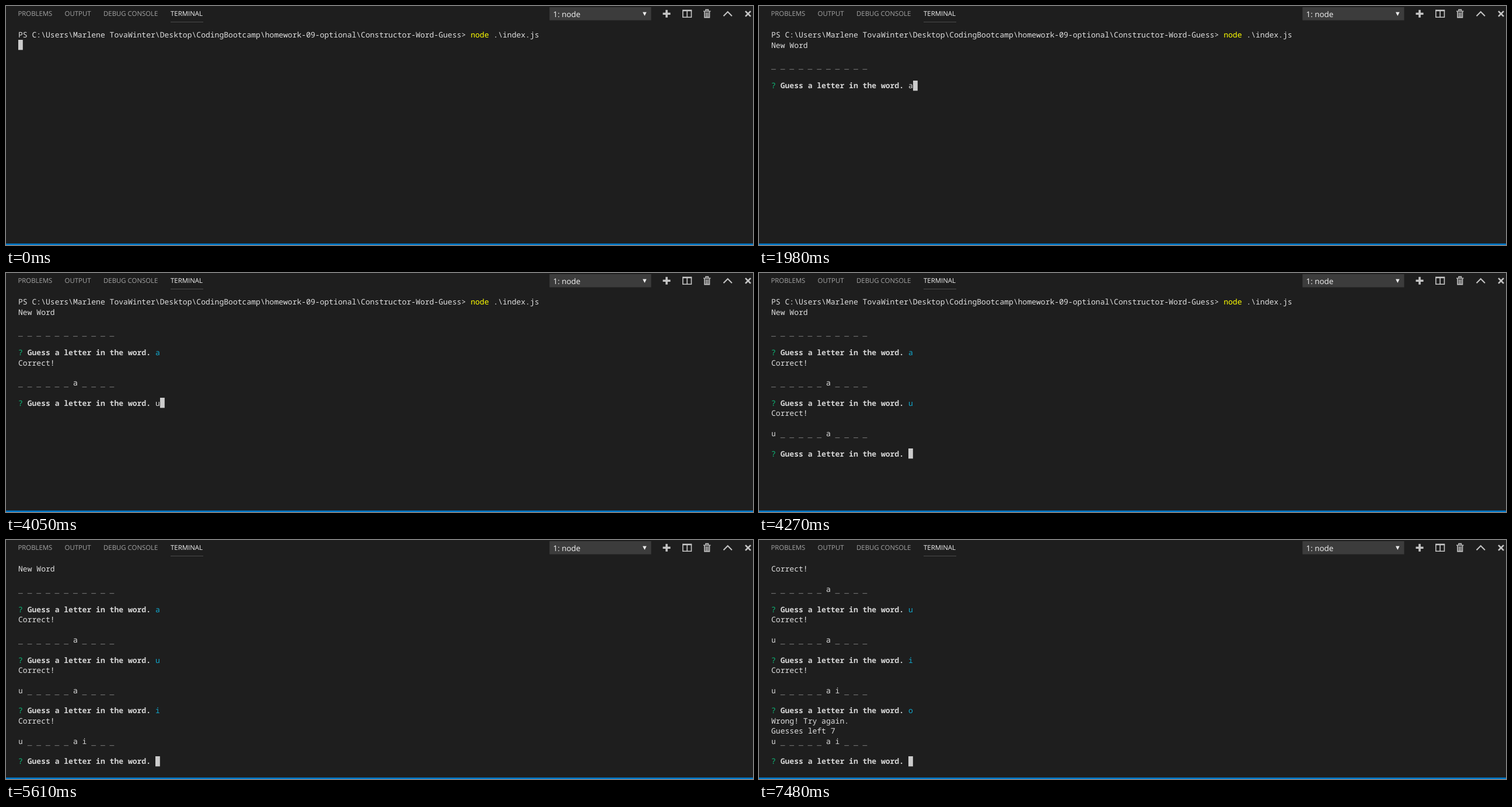
Write an HTML page that moves like this. It is 1280x410 px and loops after 8000 ms.

```html
<!DOCTYPE html>
<html lang="en">
<head>
<meta charset="utf-8">
<title>Word guess terminal</title>
<style>
  html, body { margin: 0; width: 100%; height: 100%; overflow: hidden; background: #1e1e1e; }
  svg { display: block; }
  text { white-space: pre; text-rendering: geometricPrecision; }
  .tabs { font: 11.4px "Open Sans", "Noto Sans", sans-serif; fill: #a4a4a4; }
  .tabs .active { fill: #f4f4f4; }
  .picker { font: 13.4px "Open Sans", "Noto Sans", sans-serif; fill: #f6f6f6; }
  .icons { fill: none; stroke: #c5c5c5; }
  #screen { font: 13.05px "Noto Sans Mono", "DejaVu Sans Mono", monospace; fill: #e0e0e0; }
  #screen .cursor { fill: #ccc; }
  #screen .command { fill: #ff0; }
  #screen .mark { fill: #0dbc79; }
  #screen .answer { fill: #11a8cd; }
  #screen .question { font-weight: 700; fill: #d6d6d6; }
  #screen .word { font: 13px "DejaVu Sans Mono", monospace; fill: #d6d6d6; }
</style>
</head>
<body>
<svg width="1280" height="410" viewBox="0 0 1280 410">
  <rect width="1280" height="410" fill="#1e1e1e"/>

  <g class="tabs">
    <text x="20.4" y="17">PROBLEMS</text>
    <text x="100.6" y="17">OUTPUT</text>
    <text x="167" y="17">DEBUG CONSOLE</text>
    <text x="282" y="17" class="active">TERMINAL</text>
  </g>
  <rect x="282" y="27" width="56" height="1" fill="#4c4c4c"/>

  <rect x="931.3" y="2" width="174.2" height="22.5" fill="#3c3c3c"/>
  <text class="picker" x="937.5" y="19">1: node</text>
  <path d="M1091 10.5h6.6l-3.3 6.5z" fill="#f0f0f0"/>

  <g class="icons">
    <path d="M1125.5 13.3h13M1132 6.8v13" stroke-width="3.6"/>
    <path d="M1159.8 8h14.6v11.3h-14.6zM1167.1 8v11.3" stroke-width="1.6"/>
    <path d="M1159 7.7h16.2" stroke-width="2.6"/>
    <path d="M1195 9h12.4M1199 8v-1.6h4.4v1.6" stroke-width="1.6"/>
    <path d="M1197 10v9.6h8.4V10M1199.8 11v8M1202.6 11v8" stroke-width="1.7"/>
    <path d="M1229.5 17.2l7.2-7.2 7.2 7.2" stroke-width="2"/>
    <path d="M1267 8.8l9 9M1276 8.8l-9 9" stroke-width="2.6"/>
  </g>

  <g id="screen"></g>
  <rect y="407.5" width="1280" height="2.5" fill="#007acc"/>
</svg>

<script>
const LOOP = 8000, ROWS = 20;
const LEFT = 21, TOP = 41.2, CELL = 7.83, PITCH = 17.36;
const QUESTION = 'Guess a letter in the word.';
const PATH = 'PS C:\\Users\\Marlene TovaWinter\\Desktop\\CodingBootcamp\\homework-09-optional\\Constructor-Word-Guess>';

// A line is a list of [column, text, class] pieces.
const plain = text => [[0, text, '']];
const prompt = (input, style) => [[0, '?', 'mark'], [2, QUESTION, 'question'], [30, input, style]];
const answer = letter => prompt(letter, 'answer');
const word = shown => [[0, [...shown].join(' '), 'word']];
const blank = [];

const log = [
  [[0, PATH, ''], [99, 'node', 'command'], [104, '.\\index.js', '']],
  plain('New Word'), blank, word('___________'), blank,
  answer('a'), plain('Correct!'), blank, word('______a____'), blank,
  answer('u'), plain('Correct!'), blank, word('u_____a____'), blank,
  answer('i'), plain('Correct!'), blank, word('u_____ai___'), blank,
  answer('o'), plain('Wrong! Try again.'), plain('Guesses left 7'), word('u_____ai___'), blank
];

// [start ms, line holding the cursor, typed input or null before the prompt]
const steps = [
  [0, 1, null], [320, 5, null], [390, 5, ''], [1980, 5, 'a'],
  [2440, 10, ''], [4050, 10, 'u'], [4270, 15, ''], [5290, 15, 'i'],
  [5610, 20, ''], [7310, 20, 'o'], [7480, 25, '']
];

const screen = document.getElementById('screen');
const escapeText = text => text.replace('>', '&gt;');
const drawPiece = row => ([col, text, style]) =>
  `<text class="${style}" x="${LEFT + col * CELL}" y="${Math.round(TOP + 13.2 + row * PITCH)}">${escapeText(text)}</text>`;

function drawCursor(col, row) {
  const x = Math.round(LEFT + col * CELL), y = Math.floor(TOP + row * PITCH);
  return `<rect class="cursor" x="${x}" y="${y}" width="${CELL}" height="${PITCH}"/>`;
}

function draw([, last, input]) {
  const lines = log.slice(0, last);
  lines.push(input === null ? blank : prompt(input, ''));
  const first = Math.max(0, lines.length - ROWS);
  const text = lines.slice(first).map((line, row) => line.map(drawPiece(row)).join('')).join('');
  const col = input === null ? 0 : 30 + input.length;
  screen.innerHTML = text + drawCursor(col, last - first);
}

const start = performance.now();
let current;

function tick() {
  const time = (performance.now() - start) % LOOP;
  const step = steps.findLast(([at]) => at <= time);
  if (step !== current) draw(current = step);
  requestAnimationFrame(tick);
}
tick();
</script>
</body>
</html>
```
